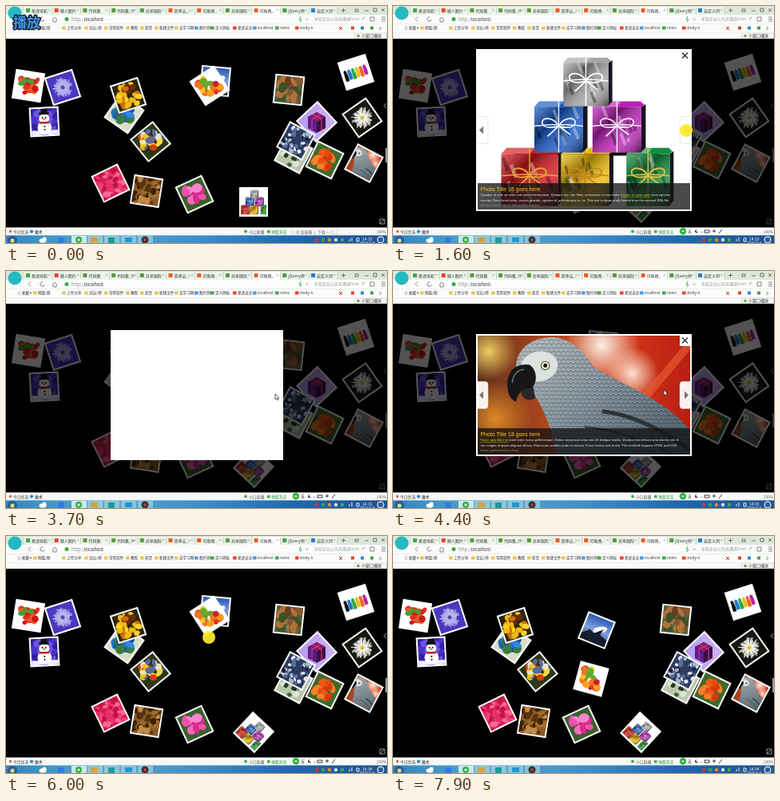
These frames come from a looping animation (477 px wide and 297 px high, 8 s). An HTML page with a canvas:

```html
<!DOCTYPE html>
<html lang="zh">
<meta charset="utf-8">
<title>Photo desk</title>
<style>
html, body { margin: 0; width: 100%; height: 100%; overflow: hidden; background: #000 }
canvas { display: block }
</style>
<canvas width="477" height="297"></canvas>
<script>
const g = document.querySelector('canvas').getContext('2d');
const LOOP = 8000;
const UI = '"Noto Sans CJK SC", "Noto Sans CJK", "Liberation Sans", sans-serif';
const ARIAL = '"Liberation Sans", Arial, sans-serif';

let seed = 1;
const rnd = () => (seed = seed * 16807 % 2147483647) / 2147483647;

// drawing helpers
const rect = (c, x, y, w, h) => { g.fillStyle = c; g.fillRect(x, y, w, h); };
const shape = (c, d) => { g.fillStyle = c; g.fill(new Path2D(d)); };
const line = (c, w, d) => { g.strokeStyle = c; g.lineWidth = w; g.stroke(new Path2D(d)); };
const oval = (c, x, y, rx, ry = rx, a = 0) => {
  g.fillStyle = c; g.beginPath(); g.ellipse(x, y, rx, ry, a, 0, 7); g.fill();
};
const round = (c, x, y, w, h, r) => {
  g.fillStyle = c; g.beginPath(); g.roundRect(x, y, w, h, r); g.fill();
};
const text = (c, size, x, y, s, font = UI) => {
  g.fillStyle = c; g.font = size + 'px ' + font; g.fillText(s, x, y);
  return g.measureText(s).width;
};
const ramp = (x0, y0, x1, y1, ...cols) => {
  const r = g.createLinearGradient(x0, y0, x1, y1);
  cols.forEach((c, i) => r.addColorStop(i / (cols.length - 1), c));
  return r;
};
const glow = (rgb, x, y, r) => {
  const s = g.createRadialGradient(x, y, 0, x, y, r);
  s.addColorStop(0, `rgba(${rgb},1)`); s.addColorStop(1, `rgba(${rgb},0)`);
  rect(s, x - r, y - r, 2 * r, 2 * r);
};
const group = (f) => { g.save(); f(); g.restore(); };

// timing helpers
const ease = (t, a, b) => {
  const p = Math.min(1, Math.max(0, (t - a) / (b - a)));
  return p * p * (3 - 2 * p);
};
const track = (t, keys) => {
  let i = 0;
  while (i < keys.length - 2 && t >= keys[i + 1][0]) i++;
  const [a, b] = [keys[i], keys[i + 1]], p = ease(t, a[0], b[0]);
  return a.slice(1).map((v, k) => v + (b[k + 1] - v) * p);
};

// big pictures
function gift(x, y, w, h, color, ribbon) {
  const m = x + w / 2, k = y + h * .42;
  shape('#181420', `M${x + w},${y}l${w * .09},${-h * .06}v${h * .95}l${-w * .09},${h * .1}z`);
  shape(color, `M${x},${y}l${w * .1},${-h * .12}h${w * .88}l${w * .08},${h * .07}l${-w * .06},${h * .05}z`);
  shape('#ffffff55', `M${x},${y}l${w * .1},${-h * .12}h${w * .5}l${-w * .1},${h * .12}z`);
  rect(color, x, y, w, h);
  rect(ramp(x, y, x + w, y + h, '#ffffff50', '#00000060', '#ffffff30', '#00000090'), x, y, w, h);
  for (let i = 0; i < 9; i++) {
    const a = x + rnd() * w * .8, b = y + rnd() * h * .7;
    shape(i % 2 ? '#ffffff55' : '#00000055', `M${a},${b}l${w * .05},${-h * .04}l${w * .1},${h * .25}l${-w * .06},${h * .04}z`);
  }
  line(ribbon, 1.5, `M${m},${y - h * .12}V${y + h}M${x},${k}Q${m},${k - 4} ${x + w},${k}`);
  line(ribbon, 1.8, `M${m},${k}c-6,-12 -22,-12 -21,-4s16,6 21,4c6,-12 22,-12 21,-4s-16,6 -21,4l-14,13M${m},${k}l15,11`);
}

function gifts() {
  seed = 77;
  rect('#fff', 0, -100, 477, 500);
  rect('#111', 150, 182, 185, 6);
  gift(134, 186, 72, 66, '#d31418', '#e8a53c');
  gift(210, 186, 61, 66, '#eebc08', '#c9861a');
  gift(293, 186, 55, 66, '#128f3c', '#e0bd45');
  gift(176, 126, 62, 58, '#1557c4', '#e6eefc');
  gift(250, 126, 62, 58, '#bb1fb8', '#f6e2f6');
  gift(213, 70, 57, 55, '#a5a5a5', '#fff');
}

function butterfly() {
  seed = 9;
  rect(ramp(131, 74, 347, 237, '#4b563c', '#30352a', '#3f4136'), 100, 50, 280, 210);
  for (let i = 0; i < 16; i++)
    oval(i % 2 ? '#5d605033' : '#10140c44', 190 + rnd() * 160, 70 + rnd() * 140, 26, 9, rnd() * 3);
  shape('#8da67c', 'M131,74H207C200,100 184,115 163,134L131,128Z');
  shape('#597443', 'M214,74H262C252,95 230,110 203,117Z');
  line('#b9cfa8', 1.2, 'M133,118C160,110 184,95 200,76');
  line('#151a10', 6, 'M219,74C196,95 188,122 146,152');
  shape('#c1d4b9', 'M131,158C150,160 171,187 178,237H131Z');
  shape('#728c63', 'M158,180C174,176 204,190 214,237H180Z');
  line('#94ac88', 1, 'M133,164C150,180 160,205 164,236');
  for (const side of [1, -1]) group(() => {
    g.translate(239, 158); g.scale(side * .96, 1);
    shape('#0c0b0b', 'M0,-12C-22,-23 -55,-30 -80,-24C-85,-19 -78,-7 -70,4C-66,12 -54,18 -49,22C-40,31 -26,33 -18,29C-8,25 -2,18 0,8Z');
    shape('#f39a0c', 'M-2,-9C-12,-20 -26,-22 -37,-18C-43,-12 -41,-6 -36,-2L-40,8C-34,18 -22,20 -13,18C-6,14 -3,10 -2,4Z');
    shape('#ffbf22', 'M-3,-7L-20,-15 -31,-12 -22,-3Z');
    line('#2b1504', 1, 'M-2,-4L-38,-14M-3,-2L-38,-3M-4,2L-35,12M-5,4L-18,18');
    shape('#eee9dc', 'M-46,-19L-62,-22 -56,-13 -68,-2 -59,2 -50,-8Z');
    line('#f4efe0', 1, 'M-74,-20l-5,4M-70,-10l-6,2');
    for (let i = 0; i < 15; i++) {
      const a = i / 14;
      oval('#e9e3d4', -69 + 62 * a, 6 + 22 * Math.sin(a * 2.3), 1.3, .8, .6);
    }
  });
  oval('#d9940f', 239, 158, 3.2, 19); oval('#f8c64a', 240, 148, 2.6, 7);
  line('#111', .8, 'M238,139C234,128 230,124 226,121M241,139C244,130 248,125 252,122');
}

function parrot() {
  rect(ramp(104, 0, 374, 0, '#5b301c', '#b2481e', '#d43a18', '#b81d12'), 80, 50, 320, 220);
  glow('238,206,96', 118, 100, 36);
  glow('225,136,36', 126, 185, 48);
  glow('250,240,226', 262, 92, 48);
  glow('250,226,205', 300, 128, 34);
  line('#f06a3a88', 10, 'M374,90L290,190');
  const body = 'M153,126C150,98 172,82 199,82C225,83 241,104 251,120C279,138 342,160 374,200V240H205C200,205 192,180 176,155Z';
  shape(ramp(170, 85, 300, 235, '#aeb6bb', '#87949d', '#56646f'), body);
  group(() => {
    g.clip(new Path2D(body));
    for (let y = 84; y < 236; y += 5) for (let x = 150 + y % 2 * 3; x < 374; x += 6) {
      const k = 2.4 + (x - 150) / 110;
      line('#2b37417a', .9, `M${x},${y}q${k},${k * 1.5} ${k * 2},0`);
      line('#e2e8ea55', .6, `M${x + 1},${y - 1}q${k},${k} ${k * 1.6},0`);
    }
    line('#2a333a', 5, 'M262,176C300,180 340,200 374,226');
    line('#39444c', 3, 'M240,196C280,200 320,212 360,236');
  });
  oval('#dde1df', 182, 119, 24, 19, -.2);
  shape('#161618', 'M170,117C150,114 140,128 142,146C143,156 147,162 153,164C154,153 161,147 173,147C180,139 180,124 170,117Z');
  shape('#28282a', 'M159,150C160,161 169,165 177,159L175,146Z');
  line('#70747a', 1.5, 'M148,140C148,130 155,123 163,123');
  oval('#55595c', 190, 118, 6); oval('#ede7b4', 190, 118, 4.8); oval('#0a0a0a', 190, 118, 2.5);
}

const slides = [
  { draw: gifts, home: [104, 54, 374, 257], cap: 35, rows: [
    'Quisque ut ante sit amet erat laoreet fermentum. Quisque nec nisl. Nam scelerisque cursus dolor. _Integer et quam quis_ risus egestas',
    'suscipit. Nam lorem tortor, viverra gravida, egestas id, pellentesque in, mi. This text is dynamically loaded from the external XML file.'],
    foot: 'Quisque laoreet nisl nec nibh porttitor tincidunt' },
  { draw: butterfly, home: [131, 74, 347, 237], cap: 33, rows: [
    '_Lorem ipsum dolor sit amet_, consectetur adipiscing elit. Quisque ut ante sit amet erat laoreet fermentum.',
    'Quisque nec nisl. Nam scelerisque cursus dolor. Pellentesque elementum enim a augue. Donec in nisl. Etiam',
    'sit amet turpis. Duis nulla diam, posuere ac, cursus id, ullamcorper sit amet, libero.'] },
  { draw: parrot, home: [104, 79, 374, 232], cap: 35, rows: [
    '_Fusce quis diam sit_ amet tortor luctus pellentesque. Donec accumsan urna non elit tristique mattis. Vivamus fermentum urna viverra nisl. In',
    'nec magna id ipsum aliquam dictum. Maecenas sodales pede eu massa. Fusce lacinia sed at nisl. This textfield supports HTML and CSS.'],
    foot: 'Donec praesent dolor et lacus' }
];

function picture(slide, x, y, w, h) {
  const [a, b, c, d] = slide.home, s = Math.max(w / (c - a), h / (d - b));
  group(() => {
    g.beginPath(); g.rect(x, y, w, h); g.clip();
    g.translate(x + w / 2, y + h / 2); g.scale(s, s); g.translate(-(a + c) / 2, -(b + d) / 2);
    slide.draw();
  });
}

// small photos, centred on 0,0
const blobs = (bg, cols, n, r, spread) => () => {
  const list = cols.split(' ');
  rect(bg, -17, -17, 34, 34);
  for (let i = 0; i < n; i++)
    oval(list[i % list.length], (rnd() * 2 - 1) * spread, (rnd() * 2 - 1) * spread,
      r * (.5 + rnd() * .6), r * (.4 + rnd() * .5), rnd() * 3);
};
const burst = (bg, color, core, n, r) => () => {
  rect(bg, -17, -17, 34, 34);
  for (let i = 0; i < n; i++) {
    const a = i * 2.4, q = r * (.65 + rnd() * .35);
    line(color, 1.1, `M0,0L${Math.cos(a) * q},${Math.sin(a) * q}`);
  }
  oval(core, 0, 0, 2.5);
};
const mini = (slide) => () => picture(slide, -17, -17, 34, 34);
function snowman() {
  blobs('#4a34c8', '#6a56e0 #3322a0', 30, 5, 17)();
  rect('#eef', -17, 11, 34, 6);
  oval('#fff', 0, 7, 9, 8); oval('#fff', 0, -4, 6.5, 6);
  rect('#111', -6, -12, 12, 3); rect('#111', -4, -16, 8, 5);
  oval('#111', -2, -5, 1); oval('#111', 2, -5, 1); oval('#e60', 0, -3, 1.2);
  rect('#b22', -6, 0, 12, 2.5); oval('#111', 0, 6, 1); oval('#111', 0, 10, 1);
}
function violetBox() {
  rect(ramp(-17, -17, 17, 17, '#b79af0', '#cdb4f6'), -17, -17, 34, 34);
  g.rotate(.75);
  shape('#3a1048', 'M-11,-6L0,-12 11,-6V8L0,14 -11,8Z');
  shape('#8a1c6a', 'M-11,-6L0,-12 11,-6 0,0Z'); shape('#5b1d8e', 'M-11,-6L0,0V14L-11,8Z');
  line('#d23a6a', 1.2, 'M-5,-9L6,-3V11M5,-9L-6,-3V11');
}
function crayons() {
  rect('#fff', -17, -17, 34, 34);
  '#111 #27c #2a4 #eb2 #e62 #b2a'.split(' ').forEach((c, i) => {
    round(c, -15 + i * 5, -1 - i % 2, 4.5, 9, 1); oval(c, -13 + i * 5, -3, 2, 3);
  });
}
function sky() {
  rect(ramp(0, -17, 0, 17, '#2b56b4', '#7fa3dc', '#26345c'), -17, -17, 34, 34);
  oval('#f2f4f8', 4, -2, 9, 4, -.5);
  shape('#161c2c', 'M-17,10L-8,2 -2,5 8,-4 6,4 17,8V17H-17Z');
}

const photos = [
  [28, 100, 9, blobs('#fff', '#e0301c #f0592c #c81e12 #e0301c #4c9a34', 20, 5, 10)],
  [71, 102, -18, burst('#4a38c0', '#b9b4ee', '#5a4a9a', 60, 13)],
  [48, 145, -3, snowman],
  [148, 135, 35, blobs('#d8dfc8', '#1f6fd0 #2f88e4 #1a4ea0 #3b7a40', 20, 7, 10)],
  [153, 112, -18, blobs('#2b2608', '#f2b90c #ffd22e #c8700c #f2b90c #6a2a08', 34, 5, 13)],
  [181, 170, -39, blobs('#2c3818', '#f6c414 #ffdc3c #d93c14 #e8e4d0 #5a6a9a', 30, 5, 12)],
  [360, 186, 28, blobs('#b9c8ad', '#3f6238 #dfe6d4 #243a20', 18, 5, 14)],
  [354, 105, 6, blobs('#50603a', '#8a5530 #b0703c #6a3a1c #3a5428', 34, 6, 13)],
  [438, 83, -18, crayons],
  [389, 145, -43, violetBox],
  [363, 169, 28, blobs('#2c3c62', '#a9b6cc #e4eaf2 #16203c #5a6e98', 46, 3.2, 16)],
  [399, 193, 26, blobs('#3f6a2c', '#ee5a14 #f9802c #d43a0c #e44c12', 16, 7, 11)],
  [446, 140, -35, burst('#14180f', '#f5f5ee', '#d8c040', 46, 15)],
  [448, 197, 28, mini(slides[2])],
  [131, 222, -26, blobs('#d81e50', '#f0407a #c01444 #e83068 #f76a94', 60, 4, 17)],
  [176, 232, 9, blobs('#8a5a26', '#c08a4a #5a3410 #a06a2c #3c220a', 56, 4.5, 17)],
  [236, 236, -25, blobs('#38602c', '#f050b0 #f884cc #d82c90 #fa6abc', 15, 7, 9)],
  [310, 246, 43, mini(slides[0])]
];
const fruit = blobs('#fff', '#e63a20 #f7a01c #f9c62c #c8203c #6aa82c #f07818', 24, 6, 11);

function photo(x, y, deg, draw, id) {
  group(() => {
    g.translate(x, y); g.rotate(deg * Math.PI / 180);
    rect('#fff', -18.5, -18.5, 37, 37);
    g.beginPath(); g.rect(-16.5, -16.5, 33, 33); g.clip();
    seed = 100 + id * 37; draw();
  });
}

function desk(t) {
  rect('#000', 0, 41, 477, 237);
  photos.forEach((p, i) => { if (i < 17 || t > 600) photo(...p, i); });
  photo(...track(t, [[7000, 262, 94, 5], [7500, 255, 118, 22]]), sky, 30);
  photo(...track(t, [[6050, 255, 100, -33], [6800, 248, 179, 15]]), fruit, 31);
  line('#bbb', .8, 'M476,122l-3,3 3,3M468,267h6v6h-6zM468,273l6,-6');
  rect('#999', 475, 178, 2, 18);
}

// browser frame
const tabs = '星途导航 懒人图片 代码集 代码集_H 共享国际 首单云_! 可拖拽.. 共享国际 可拖拽_ jQuery特 自定义列'.split(' ');
const marks = [[14, '☆ 收藏 ▾'], [40, '网盘/邮'], [76, '上传分享'], [104, '论坛/吧'], [129, '常用软件'], [156, '教程'],
  [174, '影音'], [192, '新建文件'], [217, '去学习网'], [242, '图片网'], [262, '定义网址'], [290, '星途安全'],
  [315, 'localhost'], [343, 'notes'], [368, 'study-n']];

function browser(t) {
  rect('#dce7d8', 0, 0, 477, 11);
  rect('#fbfcfa', 0, 11, 477, 30);
  const icons = ['#3fa84c', '#e8452c', '#5a9a3c', '#5a9a3c', '#5a9a3c', '#ee5b22', '#ee5b22', '#5a9a3c', '#ee5b22', '#4a9a44', '#2c7cd0'];
  tabs.forEach((s, i) => {
    const x = 23 + i * 35.7;
    rect(i == 8 ? '#fff' : '#edf4ea', x, 1, 34.8, 10);
    rect(icons[i], x + 2, 3, 5, 5);
    text('#333', 5, x + 9, 7.8, s);
    line('#999', .6, `M${x + 30},4l2.5,2.5m0,-2.5l-2.5,2.5`);
    rect('#b7c6b2', x + 34.6, 2, .6, 8);
  });
  line('#555', .8, 'M420,5.5h5M422.5,3v5M437,4h4v3h-4zM449,6h5M460,3h4v4h-4zM470,3l4,4m0,-4l-4,4');
  line('#777', .9, 'M31,13.5l-3,3 3,3M46,14a2.6,2.6 0 1 0 2,3M58,17l3,-3 3,3M59,17v3h4v-3');
  oval('#36ab4a', 76, 16.5, 2.5);
  text('#888', 5.6, 82, 18.5, 'http://'); text('#333', 5.6, 98, 18.5, 'localhost:');
  line('#4a5', 1, 'M369,13l-2,4h3l-2,3'); line('#888', .8, 'M375,15.5l2,2 2,-2');
  text('#999', 5, 386, 18.3, '年轻企业公务员遴选form');
  line('#777', .9, 'M446,17l3,-3M456,14h5v5h-5zM470,14h5M470,16.5h5M470,19h5');
  rect('#e2e6e0', 0, 22, 477, .6);
  marks.forEach(([x, s], i) => {
    if (i) rect(i < 9 ? '#ecc558' : ['#4b9cdc', '#43a848', '#e8452c'][i % 3], x - 6, 25.5, 4.6, 4);
    text('#333', 4.6, x, 29.4, s);
  });
  line('#c33', 1, 'M417,26l4,4m0,-4l-4,4'); rect('#d84a2c', 432, 25.5, 4, 4); rect('#3a86cc', 444, 25.5, 4, 4);
  rect('#46a04c', 456, 25.5, 4, 4); line('#777', .8, 'M467,26l3,2 -3,2');
  rect('#ddd', 0, 33, 477, .5);
  rect('#cfd6cc', 436, 34, 41, 7); rect('#f8faf6', 437, 34.5, 39, 6);
  oval('#58a84c', 441, 37.5, 1.8); text('#333', 5, 445, 39.4, '小窗口播放');
  oval('#25b9c1', 11, 9, 8.5);
  if (t < 1000) {
    g.font = '900 17px ' + UI; g.lineJoin = 'round'; g.lineWidth = 3; g.strokeStyle = '#14202c';
    g.strokeText('播放', 9, 26.5); g.fillStyle = '#3d9af0'; g.fillText('播放', 9, 26.5);
  }
}

function footer(t) {
  rect('#f7f8f6', 0, 277.5, 477, 10);
  rect('#d66', 4, 281, 3, 3); text('#444', 4.8, 9, 284.6, '今日优选');
  oval('#2b8ad8', 32, 282.6, 2.2); text('#222', 4.8, 36, 284.6, '魔术');
  oval('#3bb04a', 300, 282.6, 2); text('#555', 4.8, 304, 284.6, '小口直播');
  rect('#3bb04a', 327, 281, 3.5, 3.5); text('#2a9a3c', 4.8, 332, 284.6, '弹窗浏览');
  text('#666', 4.8, 357, 284.6, '◇ ⊘ 加速器 ↓ 下载 ⌂ ◁ ▢'); text('#666', 4.8, 464, 284.6, '100%');
  rect(ramp(0, 287, 477, 287, '#2f86c0', '#58a8cc', '#3f8fca', '#1e68b0', '#20508c'), 0, 287, 477, 10);
  rect('#ffffff60', 0, 287, 477, 1);
  [82, 102, 123, 144, 165].forEach((x, i) => rect(i ? '#d5f0ea70' : '#eefbf0cc', x, 288, 19, 9));
  oval('#2c5c94', 8, 294, 6); oval('#d0e870', 8, 294, 2.5);
  oval('#fff', 46, 294, 4.5, 2.8); oval('#fff', 48, 292, 2.6);
  rect('#2f7de0', 65, 290, 8, 7); oval('#32b048', 91, 293, 4); oval('#e8f8e8', 91, 293, 1.6);
  rect('#d9a03c', 106, 290, 9, 6); rect('#1d9a9a', 128, 290, 8, 7);
  rect('#1c98d8', 149, 290, 9, 6); oval('#30353a', 174, 293, 4.5); oval('#e03a30', 174, 293, 1.7);
  ['#d33', '#3a4', '#e82', '#ddd', '#36b44a'].forEach((c, i) => oval(c, 389 + i * 8, 293, 2.2));
  line('#fff', .9, 'M430,295v-3M433,295v-5M439,291h3v4h-3z');
  text('#fff', 5, 446, 293.6, t < 5500 ? '14:33' : '14:34');
  text('#fff', 4.5, 443, 299, '2019/6/8');
  oval('#dfeaf4', 469, 293, 4.5); oval('#2c5f9c', 469, 293, 3.2);
  if (t < 300) return;
  round('#fff', 358, 278, 58, 9, 3);
  oval('#2fb53c', 363, 282.3, 4.2); rect('#fff', 361.5, 281.6, 3, 1.4);
  text('#222', 5, 369, 284.4, '五');
  oval('#222', 380, 282.3, 2); oval('#fff', 381, 281.6, 1.6);
  line('#222', .9, 'M386,283v1M390,281h6v3h-6zM402,280v4M400,282h4M408,285l4,-5');
}

// lightbox
function caption(slide, n) {
  const [x0, , x1, y1] = slide.home, top = y1 - slide.cap, x = x0 + 5.5;
  rect('rgba(18,18,18,.76)', x0 + 2, top, x1 - x0 - 4, slide.cap - 2);
  text('#ffc61a', 6.9, x, top + 9.5, `Photo Title ${n} goes here`, ARIAL);
  slide.rows.forEach((row, i) => {
    let cx = x, y = top + 16.4 + i * 6.2;
    row.split('_').forEach((part, k) => {
      const w = text(k % 2 ? '#d4e11a' : '#f0f0f0', 4.05, cx, y, part, ARIAL);
      if (k % 2) rect('#d4e11a', cx, y + .6, w, .4);
      cx += w;
    });
  });
  if (slide.foot) text('#999', 3.6, x, top + 29, slide.foot, ARIAL);
}

function lightbox(t) {
  const shut = 1 - ease(t, 5200, 5500);
  if (!shut) return;
  rect(`rgba(0,0,0,${.68 * shut * ease(t, 50, 400)})`, 0, 41, 477, 236.5);
  const [x0, y0, x1, y1] = track(t, [[0, 292, 227, 328, 264], [100, 292, 227, 328, 264], [450, ...slides[0].home],
    [1900, ...slides[0].home], [2200, ...slides[1].home], [3700, ...slides[1].home], [4000, ...slides[2].home]]);
  const n = t < 2000 ? 0 : t < 3800 ? 1 : 2;
  const show = [1 - ease(t, 1700, 1900), ease(t, 2200, 2450) * (1 - ease(t, 3400, 3650)), ease(t, 4050, 4300)][n];
  group(() => {
    g.globalAlpha = shut;
    rect('#fff', x0, y0, x1 - x0, y1 - y0);
    g.globalAlpha = shut * show;
    if (!show) return;
    picture(slides[n], x0 + 2, y0 + 2, x1 - x0 - 4, y1 - y0 - 4);
    g.globalAlpha *= ease(t, 400, 580);
    caption(slides[n], 16 + n);
    const my = (y0 + y1) / 2;
    round('#fffffff0', x0, my - 17, 15, 34, [0, 4, 4, 0]);
    round('#fffffff0', x1 - 15, my - 17, 15, 34, [4, 0, 0, 4]);
    line('#ccc', .5, `M${x0 + 2},${my - 17}h10q3,0 3,4v26q0,4 -3,4h-10M${x1 - 2},${my - 17}h-10q-3,0 -3,4v26q0,4 3,4h10`);
    shape('#777', `M${x0 + 9},${my - 5}v10l-5,-5zM${x1 - 9},${my - 5}v10l5,-5z`);
    rect('#fff', x1 - 15, y0 + 1, 14, 14);
    line('#333', 1.5, `M${x1 - 12},${y0 + 4.5}l7,7m0,-7l-7,7`);
  });
}

function pointer(t) {
  if (t < 250 || t > 7650) return;
  const [x, y] = track(t, [[250, 314, 220], [600, 321, 145], [1000, 321, 145], [1500, 367, 156], [1900, 367, 156],
    [2300, 345, 157], [3400, 345, 157], [3700, 337, 154], [4300, 337, 154], [4900, 365, 87], [5250, 365, 87],
    [5800, 254, 127], [6050, 254, 127], [6800, 247, 206], [7000, 262, 108], [7500, 255, 132]]);
  const pressed = [[1500, 1700], [3200, 3400], [4950, 5250], [5900, 6800], [7000, 7450]].some(([a, b]) => t >= a && t < b);
  if (pressed) return oval('#fbea2cf0', x, y, 8);
  group(() => {
    g.translate(x, y);
    const arrow = 'M0,0V7L1.6,5.5 2.8,8 3.8,7.5 2.7,5.2H5Z';
    shape('#fff', arrow); line('#222', .7, arrow);
  });
}

function frame() {
  const t = performance.now() % LOOP;
  desk(t);
  lightbox(t);
  browser(t);
  footer(t);
  pointer(t);
  requestAnimationFrame(frame);
}
frame();
</script>
</html>
```
